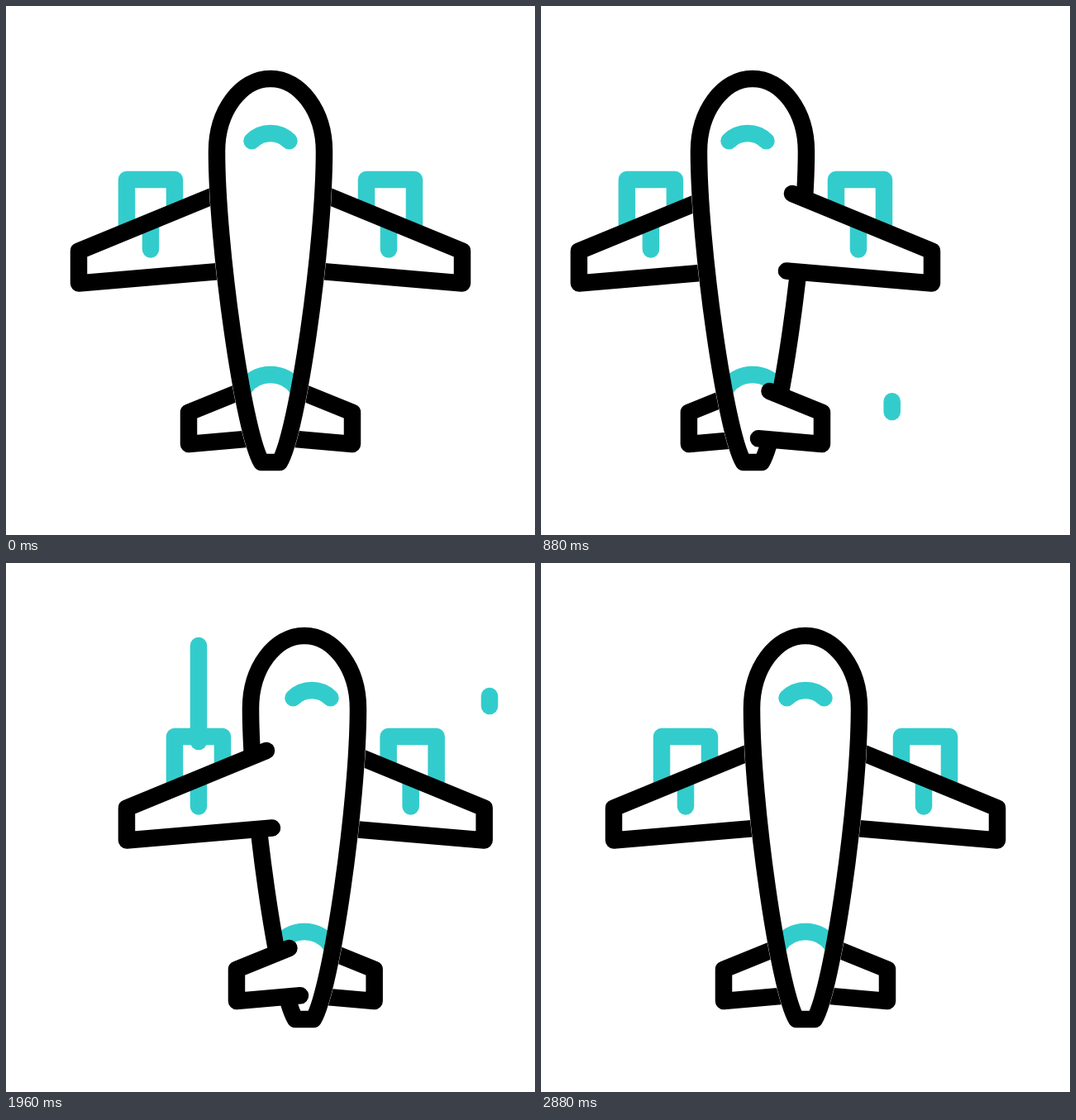
An HTML page with a canvas that plays this animation: 640 by 640 pixels, repeating every 3 s.

```html
<!DOCTYPE html>
<html lang="en">
<head>
<meta charset="utf-8">
<title>Banking plane</title>
<style>
html, body { margin: 0; width: 100%; height: 100%; overflow: hidden; background: #fff; }
canvas { display: block; width: 100vmin; height: 100vmin; }
</style>
</head>
<body>
<canvas id="stage" width="640" height="640"></canvas>
<script>
const ctx = document.getElementById('stage').getContext('2d');
const LOOP = 3000, STEP = 40, WIDTH = 20.5;
const INK = '#000', TEAL = '#33cccc', PAPER = '#fff';

const body = new Path2D('M255 176C255 289 287 515 309 552H331C353 515 385 289 385 176C385 127.4 355.9 88 320 88C284.1 88 255 127.4 255 176Z');
const windscreen = new Path2D('M297.5 163.3A32 32 0 0 1 342.5 163.3');
const finArc = new Path2D('M288 462A40 40 0 0 1 352 462');
// Left half of the plane; the right half is its mirror image.
const wings = new Path2D('M257 227L88 296.5V335.5L264 320.5M284.5 466L221 491.7V530L298 523.3');
const wingArea = new Path2D('M272 227H257L88 296.5V335.5L264 320.5H279ZM302 466H284.5L221 491.7V530L298 523.3H314Z');
const engine = new Path2D('M146 268V210H204V245');

// How far each part swings in the left and right bank, and how slowly it follows
const leftWing = { left: 43, right: 87, pace: 0.94, stick: 175 };
const rightWing = { left: 80.7, right: 40, pace: 1.07, stick: 177, mirrored: true };
const fuselage = { left: 65.4, right: 61.5, pace: 1 };
const glass = { left: 71.5, right: 75, pace: 1 };

// Air streaks run down a fixed line.
const STREAK_LENGTH = 150;
const streaks = [
  { start: 300, x: 114, top: 79 },
  { start: 355, x: 424.7, top: 341 },
  { start: 1720, x: 233, top: 100 },
  { start: 1900, x: 585, top: 161 }
];

function ease(t, start, duration) {
  const u = Math.min(1, Math.max(0, (t - start) / duration));
  return u * u * (3 - 2 * u);
}

function shift(t, { left, right, pace }) {
  const bankLeft = ease(t, 80, 700 * pace) - ease(t, 820, 700);
  const bankRight = ease(t, 1580, 620) - ease(t, 2200, 510 * pace);
  return right * bankRight - left * bankLeft;
}

function stroke(path, color, cap = 'round', width = WIDTH) {
  ctx.strokeStyle = color;
  ctx.lineWidth = width;
  ctx.lineCap = cap;
  ctx.stroke(path);
}

function fill(path) {
  ctx.fillStyle = PAPER;
  ctx.fill(path);
}

function moved(t, part, draw) {
  ctx.save();
  ctx.translate(shift(t, part) + (part.mirrored ? 640 : 0), 0);
  if (part.mirrored) ctx.scale(-1, 1);
  draw();
  ctx.restore();
}

function drawWing(t, wing) {
  moved(t, wing, () => {
    stroke(engine, TEAL, 'butt');
    fill(wingArea);
    stroke(new Path2D(`M${wing.stick} 262V294.5`), TEAL);
    stroke(wings, INK);
  });
}

function drawBody(t) {
  moved(t, fuselage, () => {
    fill(body);
    stroke(body, PAPER, 'round', WIDTH + 0.6);
    stroke(finArc, TEAL, 'butt');
    stroke(body, INK);
  });
  moved(t, glass, () => stroke(windscreen, TEAL));
}

function drawStreak(t, { start, x, top }) {
  const head = top + STREAK_LENGTH * ease(t, start, 347);
  const tail = top + STREAK_LENGTH * ease(t, start + 240, 347);
  if (head - tail > 1) stroke(new Path2D(`M${x} ${tail}V${head}`), TEAL);
}

function render(t) {
  ctx.fillStyle = PAPER;
  ctx.fillRect(0, 0, 640, 640);
  ctx.lineJoin = 'round';
  streaks.forEach(streak => drawStreak(t, streak));

  // The raised wing passes in front of the body while banking.
  const rightUp = t >= 120 && t < 1540;
  const leftUp = t >= 1540 && t < 2880;
  if (!leftUp) drawWing(t, leftWing);
  if (!rightUp) drawWing(t, rightWing);
  drawBody(t);
  if (leftUp) drawWing(t, leftWing);
  if (rightUp) drawWing(t, rightWing);
}

function tick() {
  const t = performance.now() % LOOP;
  render(Math.floor(t / STEP) * STEP);
  requestAnimationFrame(tick);
}
tick();
</script>
</body>
</html>
```
